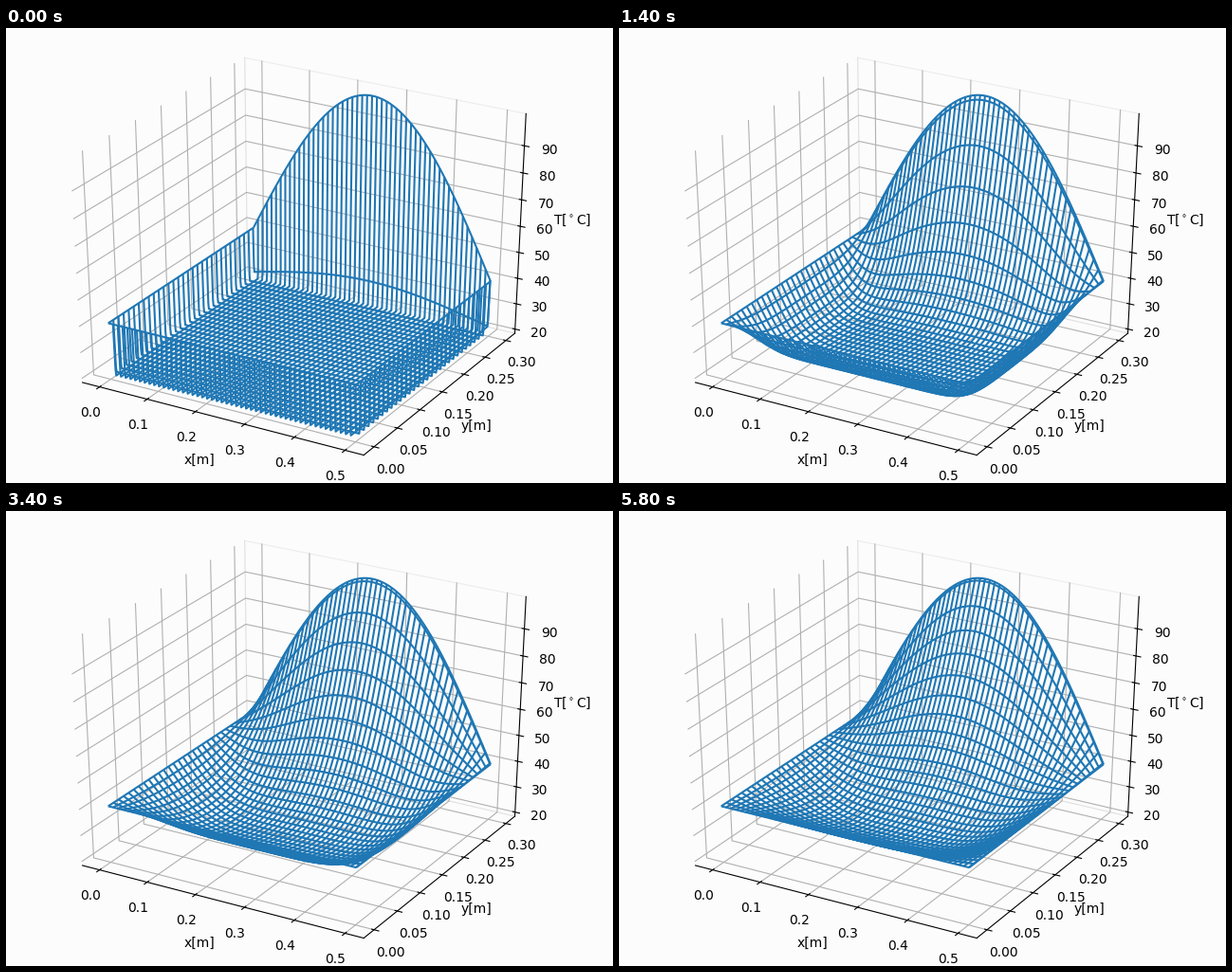
A matplotlib script for the animation above (6000 ms loop, 640x480 px).

```python
import numpy as np
import matplotlib.pyplot as plt
from matplotlib.animation import FuncAnimation
from matplotlib.collections import LineCollection

W, H, DPI = 640, 480, 100
FRAMES, INTERVAL = 30, 200
BG, GRID, BLUE = "#fcfcfc", "#b0b0b0", "#1f77b4"

# plate: size in m, nodes, copper diffusivity, explicit time step
A, B = 0.5, 0.3
NX, NY = 502, 302
ALPHA, DT, STEPS = 1.165e-4, 1e-3, 1000
STRIDE = 10

# camera
AZIM, ELEV, DIST = np.radians(-60), np.radians(30), 10
AX_W = 0.95 * W
EDGE = 0.5 + 1 / 48
POINT = 48 / (72 * (AX_W + H) / DPI) / 12
TICK_OUT, TICK_IN = 0.2 / 12, 0.1 / 12


def project(x, y, z):
    """Unit cube centred on 0 -> stage pixels."""
    ca, sa, ce, se = np.cos(AZIM), np.sin(AZIM), np.cos(ELEV), np.sin(ELEV)
    right = -sa * x + ca * y
    toward = ca * x + sa * y
    up = ce * z - se * toward
    w = DIST - (ce * toward + se * z)
    px = AX_W * (right / w + 0.095) / 0.185
    py = H - H * (up / w + 0.095) / 0.185
    return np.stack(np.broadcast_arrays(px, py), axis=-1)


def sine_modes(n, length):
    """Orthonormal sine basis and the decay of each mode in one step."""
    k = np.arange(1, n + 1)
    basis = np.sqrt(2 / (n + 1)) * np.sin(np.pi * np.outer(k, k) / (n + 1))
    r = ALPHA * DT / (length / (n + 1)) ** 2
    return basis, 4 * r * np.sin(np.pi * k / (2 * (n + 1))) ** 2


xs, ys = np.linspace(0, A, NX), np.linspace(0, B, NY)
steady = 40 + 60 * np.outer(np.sinh(np.pi * ys / A) / np.sinh(np.pi * B / A),
                            np.sin(np.pi * xs / A))
SX, dx_decay = sine_modes(NX - 2, A)
SY, dy_decay = sine_modes(NY - 2, B)
start = SY @ (20 - steady[1:-1, 1:-1]) @ SX
factor = 1 - dy_decay[:, None] - dx_decay[None, :]


def temperature(n):
    t = steady.copy()
    t[1:-1, 1:-1] += SY @ (start * factor ** n) @ SX
    return t


def to_cube(v, size):
    return (v / size - 0.5) / 1.1


def z_cube(t):
    return (t - 20) / 80 - 0.5


U, V = np.meshgrid(to_cube(xs, A), to_cube(ys, B))
rows = list(range(0, NY, STRIDE)) + [NY - 1]
cols = list(range(0, NX, STRIDE)) + [NX - 1]

fig = plt.figure(figsize=(W / DPI, H / DPI), dpi=DPI, facecolor=BG)
ax = fig.add_axes([0, 0, 1, 1])
ax.set_xlim(0, W)
ax.set_ylim(H, 0)
ax.axis("off")


def line(points, color, lw, z):
    p = project(*np.array(points, float).T)
    ax.plot(p[:, 0], p[:, 1], color=color, lw=lw, zorder=z)


def text(pos, s, va):
    x, y = project(*pos)
    ax.text(x, y, s, ha="center", va=va, fontsize=10,
            family="DejaVu Sans", zorder=4)


def draw_axis(axis, ticks, fmt, to_pos, name):
    lo, hi = -EDGE, EDGE
    # the axis edge, and the path of its grid lines over the two panes
    edge = [(0, lo, lo), (hi, 0, lo), (hi, hi, 0)][axis]
    path = [[(0, lo, lo), (0, hi, lo), (0, hi, hi)],
            [(hi, 0, lo), (lo, 0, lo), (lo, 0, hi)],
            [(lo, lo, 0), (lo, hi, 0), (hi, hi, 0)]][axis]
    tick_dir = 1 if axis == 0 else 0

    def at(p, v, pad=0.0):
        q = np.array(p, float)
        q += pad * np.sign(q)
        q[axis] = v
        return q

    line([at(edge, lo), at(edge, hi)], "black", 0.8, 2)
    for t in ticks:
        v = to_pos(t)
        line([at(p, v) for p in path], GRID, 0.8, 1)
        outer, inner = at(edge, v), at(edge, v)
        sign = np.sign(edge[tick_dir])
        outer[tick_dir] += sign * TICK_OUT
        inner[tick_dir] -= sign * TICK_IN
        line([outer, inner], "black", 0.8, 3)
        text(at(edge, v, 11.5 * POINT), fmt % t, "top")
    text(at(edge, 0, 25 * POINT), name, "center")


# faint outline of the back pane, darker where it meets another pane
line([(-EDGE, EDGE, EDGE), (EDGE, EDGE, EDGE)], "#ececec", 0.8, 0.5)
line([(-EDGE, EDGE, EDGE), (-EDGE, EDGE, -EDGE), (EDGE, EDGE, -EDGE)],
     "#e0e0e0", 0.8, 0.5)
draw_axis(0, np.arange(6) * 0.1, "%.1f", lambda v: to_cube(v, A), "x[m]")
draw_axis(1, np.arange(7) * 0.05, "%.2f", lambda v: to_cube(v, B), "y[m]")
draw_axis(2, range(20, 100, 10), "%d", z_cube, r"T[$^\circ$C]")

mesh = LineCollection([], colors=BLUE, linewidths=1.5, zorder=5)
ax.add_collection(mesh, autolim=False)


def update(i):
    p = project(U, V, z_cube(temperature(STEPS * i + 1)))
    mesh.set_segments([p[r] for r in rows] + [p[:, c] for c in cols])
    return [mesh]


anim = FuncAnimation(fig, update, frames=FRAMES, interval=INTERVAL,
                     init_func=lambda: [mesh], repeat=True, repeat_delay=0)
plt.show()
```
